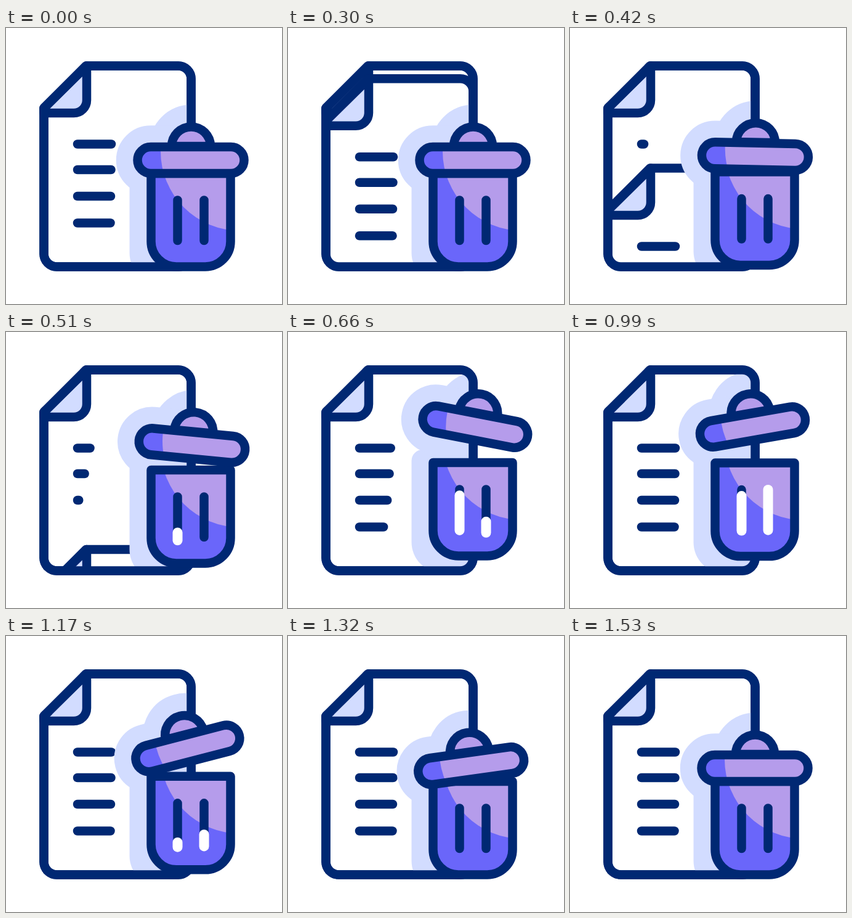
Animation of 448x448 px, one loop 1.8 s. Source, as an HTML page:

```html
<!DOCTYPE html>
<html lang="en">
<head>
<meta charset="utf-8">
<title>Delete document</title>
<style>
  html, body { margin: 0; height: 100%; overflow: hidden; background: #fff; }
  svg { display: block; width: 100vw; height: 100vh; }
  .ink { stroke: #002873; stroke-width: 14.5; stroke-linecap: round; stroke-linejoin: round; }
  .wipe { stroke: #fff; stroke-width: 16; stroke-linecap: round; }
  .pale { fill: #d2dcff; stroke: #d2dcff; }
</style>
</head>
<body>
<svg viewBox="0 0 448 448" fill="none">
  <defs>
    <path id="sheet" d="M61.5 130 130 61.5H279.5a21 21 0 0 1 21 21V366.5a21 21 0 0 1-21 21H82.5a21 21 0 0 1-21-21Z"/>
    <path id="fold" d="M131 61.5V117a21 21 0 0 1-21 21H61.5V130Z"/>
    <path id="bin" d="M235.5 236H364.5V346.5a41 41 0 0 1-41 41H276.5a41 41 0 0 1-41-41Z"/>
    <rect id="lid" x="213.5" y="193" width="173" height="43" rx="21.5"/>
    <path id="knob" d="M269 192a31.5 31.5 0 0 1 63 0Z"/>
    <g id="page" class="ink">
      <use href="#sheet" fill="#fff"/>
      <use href="#fold" fill="#d2dcff"/>
    </g>
    <clipPath id="inSheet"><use href="#sheet"/></clipPath>
    <clipPath id="inBin"><use href="#bin"/></clipPath>
    <clipPath id="inLid"><use href="#lid"/></clipPath>
  </defs>

  <use href="#page"/>
  <g id="newLines" class="ink"></g>
  <g clip-path="url(#inSheet)">
    <g id="oldPage"><use href="#page"/><g id="oldLines" class="ink"></g></g>
    <g class="pale">
      <path class="binMove" stroke="none" d="M200.5 233a18 18 0 0 1 18-18H400V415H250.500a50 50 0 0 1-50-50Z"/>
      <g class="lidMove" stroke-width="69.500"><use href="#knob" stroke-width="72"/><use href="#lid"/></g>
    </g>
  </g>
  <use href="#sheet" class="ink"/>

  <g class="binMove">
    <use href="#bin" fill="#6a66fa"/>
    <circle cx="380" cy="200" r="129" fill="#b59ceb" clip-path="url(#inBin)"/>
    <use href="#bin" class="ink"/>
    <path class="ink" d="M278.500 279.500V345M321.500 279.500V345"/>
    <line class="wipe" x1="278.500" x2="278.500"/>
    <line class="wipe" x1="321.500" x2="321.500"/>
  </g>
  <g class="lidMove">
    <use href="#knob" class="ink" fill="#b59ceb"/>
    <use href="#lid" fill="#6a66fa"/>
    <circle cx="380" cy="200" r="129" fill="#b59ceb" clip-path="url(#inLid)"/>
    <use href="#lid" class="ink"/>
  </g>
</svg>
<script>
const LOOP = 1800, STEP = 30;
const $ = id => document.getElementById(id);
const all = selector => [...document.querySelectorAll(selector)];

const ramp = (t, start, end) => Math.min(1, Math.max(0, (t - start) / (end - start)));
const smooth = (t, start, end) => {
  const x = ramp(t, start, end);
  return x * x * (3 - 2 * x);
};
const cubic = x => x < 0.5 ? 4 * x ** 3 : 1 - 4 * (1 - x) ** 3;

const set = (el, attrs) => {
  for (const name in attrs) el.setAttribute(name, attrs[name]);
};
const show = (el, on) => set(el, { visibility: on ? 'visible' : 'hidden' });

const lineEnd = i => 171 - i * 0.5;
const addLines = parent => [188.5, 230, 273, 316.5].map((y, i) => {
  const line = document.createElementNS('http://www.w3.org/2000/svg', 'line');
  set(line, { x1: 116, x2: lineEnd(i), y1: y, y2: y });
  return parent.appendChild(line);
});

addLines($('oldLines'));
const newLines = addLines($('newLines'));
const wipes = all('.wipe'), binParts = all('.binMove'), lidParts = all('.lidMove');

function draw(t) {
  set($('oldPage'), { transform: `translate(0 ${332 * cubic(ramp(t, 180, 660))})` });

  newLines.forEach((line, i) => {
    const p = smooth(t, 360 + 60 * i, 722);
    set(line, { x2: 116 + (lineEnd(i) - 116) * p });
    show(line, p > 0);
  });

  const rise = smooth(t, 360, 660);
  const binY = -24 * (rise - smooth(t, 957, 1308));
  const lidY = -61 * (rise - smooth(t, 975, 1385));
  const angle = 11 * rise - 26 * smooth(t, 660, 1120) + 15 * smooth(t, 1125, 1530);
  binParts.forEach(el => set(el, { transform: `translate(0 ${binY})` }));
  lidParts.forEach(el => set(el, { transform: `translate(0 ${lidY}) rotate(${angle} 300 235)` }));

  wipes.forEach((line, i) => {
    const p = smooth(t, 452 + 128 * i, 729 + 128 * i) - smooth(t, 920 + 57 * i, 1197 + 57 * i);
    set(line, { y1: 345 - 66 * p, y2: 345 + 6 * (1 - p) });
    show(line, p > 0.001);
  });
}

function tick() {
  const t = performance.now() % LOOP;
  draw(Math.floor(t / STEP) * STEP);
  requestAnimationFrame(tick);
}
tick();
</script>
</body>
</html>
```
